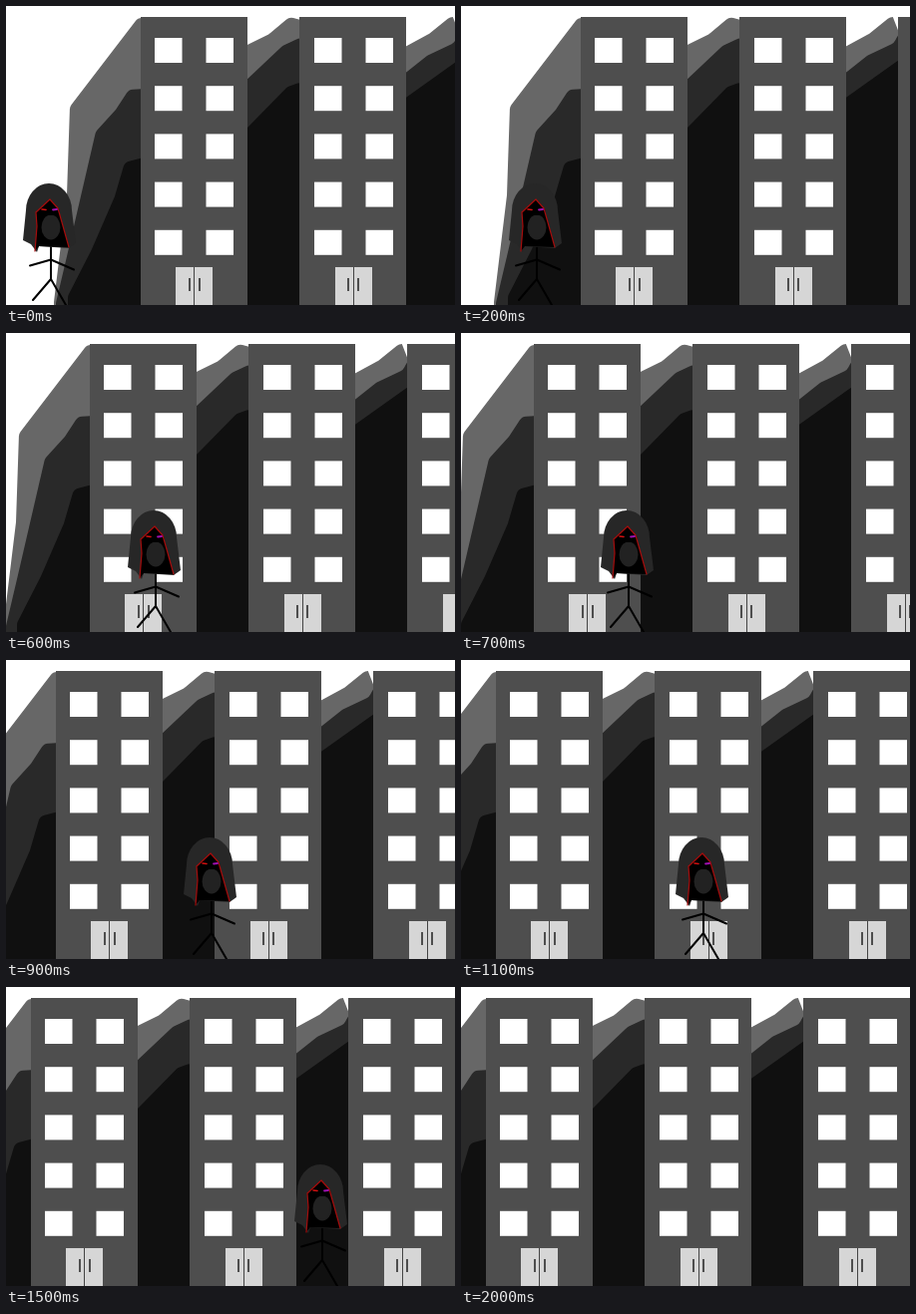
Animation of 450x300 px, one loop 2100 ms. Source, as an HTML page with a canvas:

```html
<!DOCTYPE html>
<html>
<head>
<meta charset="utf-8">
<style>
html, body { margin: 0; width: 100%; height: 100%; overflow: hidden; background: #fff; }
canvas { display: block; }
</style>
</head>
<body>
<canvas id="stage" width="450" height="300"></canvas>
<script>
const ctx = document.getElementById('stage').getContext('2d');
const LOOP = 2100, STEP = 100, ARRIVE = 1500, FADE = 500;

// The street scrolls, easing out until the walker arrives
const SCROLL = [[0, 0], [400, 30], [700, 62], [900, 85], [1100, 100], [ARRIVE, 110]];

function scrollAt(t) {
  const i = SCROLL.findIndex(([time]) => time > t);
  if (i < 0) return 110;
  const [t0, a] = SCROLL[i - 1], [t1, b] = SCROLL[i];
  return Math.round(a + (b - a) * (t - t0) / (t1 - t0));
}

const walkAt = t => Math.round(Math.max(45, 317 - 0.1857 * Math.max(0, ARRIVE - t)));
const alphaAt = t => Math.min(1, Math.max(0, 1 - (t - ARRIVE) / FADE));

function rect(x, y, w, h, color) {
  ctx.fillStyle = color;
  ctx.fillRect(x, y, w, h);
}

function path(c, points) {
  c.beginPath();
  points.forEach(p => c.lineTo(...p));
}

function line(c, color, width, ...points) {
  path(c, points);
  c.strokeStyle = color;
  c.lineWidth = width;
  c.stroke();
}

function fill(c, color, ...points) {
  path(c, points);
  c.fillStyle = color;
  c.fill();
}

function oval(c, color, x, y, rx, ry) {
  c.beginPath();
  c.ellipse(x, y, rx, ry, 0, 0, Math.PI * 2);
  c.fillStyle = color;
  c.fill();
}

// A ridge with rounded corners, filled down to the ground
function hill(color, ...ridge) {
  ctx.beginPath();
  ctx.moveTo(ridge[0][0], 300);
  ridge.forEach((p, i) => {
    const next = ridge[i + 1] || [560, p[1]];
    ctx.arcTo(...p, ...next, 8);
  });
  ctx.lineTo(560, 300);
  ctx.fillStyle = color;
  ctx.fill();
}

function hills() {
  hill('#676767', [48, 297], [61, 190], [64, 101], [133, 11], [238, 41], [264, 28], [284, 11],
    [398, 42], [424, 28], [445, 11]);
  hill('#292929', [50, 298], [62, 247], [90, 126], [110, 104], [123, 84], [238, 77], [277, 40], [294, 32],
    [398, 69], [422, 50], [449, 37], [454, 27]);
  hill('#101010', [62, 291], [86, 244], [109, 191], [119, 157], [238, 126], [282, 81], [294, 77],
    [398, 94], [454, 54]);
}

function building(i) {
  const x = 135 + 159 * i, inner = x + (i ? 1 : 0);
  rect(x, 11, 107, 289, '#4e4e4e');
  for (let row = 0; row < 5; row++) {
    for (const dx of [14, 65.5]) rect(inner + dx, 32 + row * 48.2, 27.5, 25, '#fff');
  }
  rect(inner + 35, 262, 37, 38, '#d6d6d6');
  rect(inner + 53, 262, 1, 38, '#444');
  for (const dx of [48, 58]) rect(x + dx, 273, 2, 13, '#4e4e4e');
}

function makeWalker() {
  const cv = document.createElement('canvas');
  cv.width = 80;
  cv.height = 300;
  const c = cv.getContext('2d');
  c.translate(40, 0);
  c.lineCap = c.lineJoin = 'round';

  line(c, '#000', 2, [0, 240], [0, 274]);
  line(c, '#000', 2, [-21, 260.5], [0, 254.5], [23, 264.5]);
  line(c, '#000', 2, [-18, 295], [0, 274], [15, 300]);

  // Hood
  oval(c, '#272727', -2, 205, 23, 27);
  fill(c, '#272727', [-25, 205], [-28, 235], [-20, 239], [-14, 247], [-12, 241],
    [18, 243], [25, 238], [21, 205]);

  // Face
  const left = [[-16, 246], [-14, 221], [-15, 207]], right = [[7, 203], [11, 217], [18, 242]];
  const edge = [...left, [-1, 194], ...right];
  fill(c, '#000', ...edge, [-12, 241]);
  oval(c, '#222', 0, 222, 9.5, 12.5);
  fill(c, '#000', [-14, 206], [-1, 195], [8, 204], [9, 210], [-12, 210]);
  line(c, '#a50c0c', 1.2, ...edge);
  line(c, '#d01010', 1.6, [-9, 204], [-5, 204.5]);
  line(c, '#a010b0', 1.8, [2, 204.5], [6, 204]);
  return cv;
}

const walker = makeWalker();

function draw(t) {
  rect(0, 0, 450, 300, '#fff');
  ctx.save();
  ctx.translate(-scrollAt(t), 0);
  hills();
  for (let i = 0; i < 3; i++) building(i);
  ctx.restore();

  ctx.globalAlpha = alphaAt(t);
  ctx.drawImage(walker, walkAt(t) - 40, 0);
  ctx.globalAlpha = 1;
}

const start = performance.now();
function tick() {
  const t = (performance.now() - start) % LOOP;
  draw(Math.floor(t / STEP) * STEP);
  requestAnimationFrame(tick);
}
tick();
</script>
</body>
</html>
```
